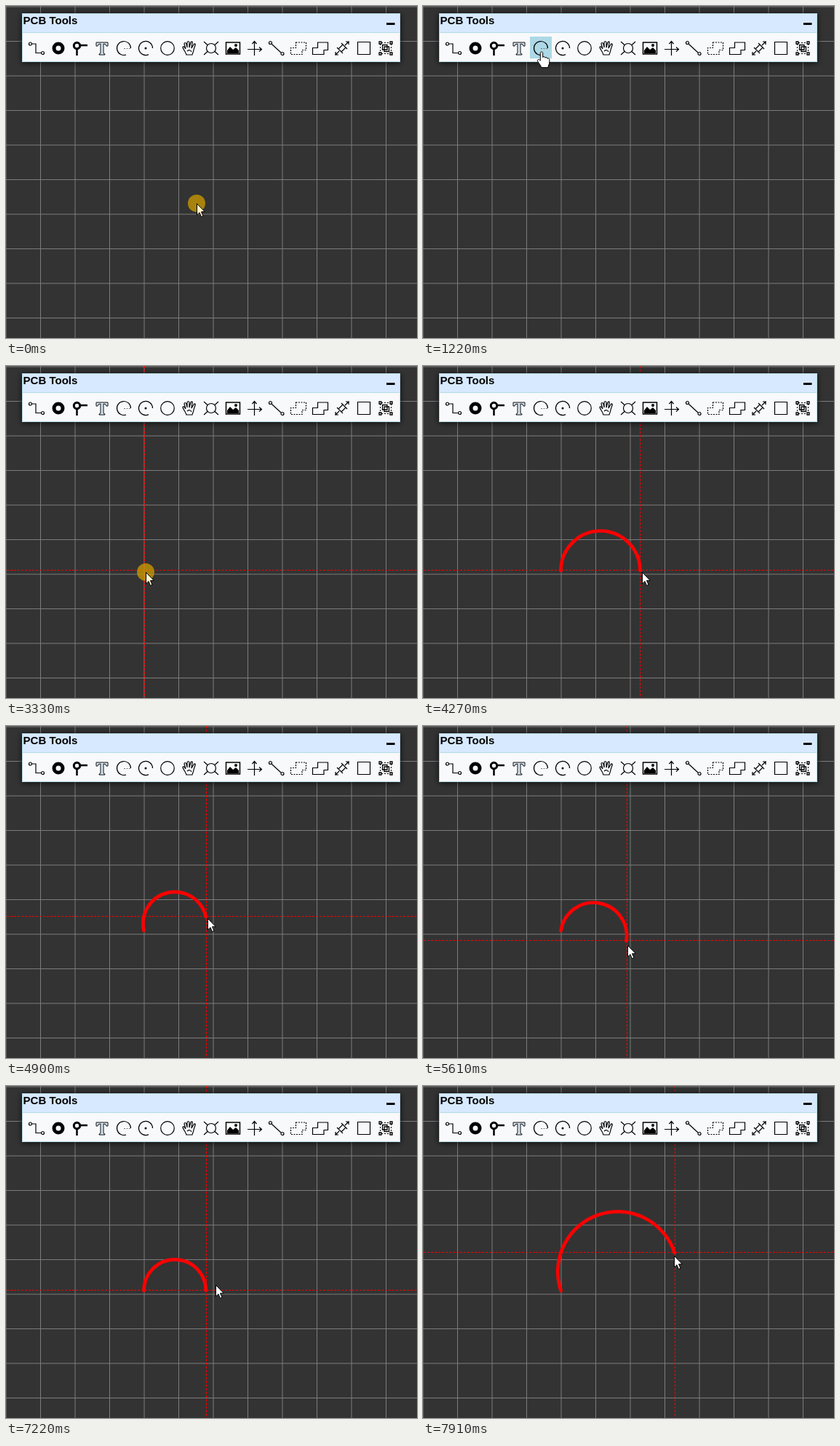
Animation, 565 px wide and 456 px high, one loop 8000 ms. Source, as an HTML page:

```html
<!DOCTYPE html>
<html lang="en">
<head>
<meta charset="utf-8">
<title>PCB Tools</title>
<style>
html, body { margin: 0; width: 100%; height: 100%; overflow: hidden; background: #333; }
svg { display: block; width: 565px; height: 456px; }
.title { font: bold 15px "Liberation Sans", Arial, sans-serif; }
.icons { fill: none; stroke: #000; stroke-width: 1.2; }
.icons .solid { fill: #000; stroke: none; }
.cross { fill: none; stroke: #f00; stroke-dasharray: 3 2; }
.pointer { stroke: #000; stroke-linejoin: round; }
</style>
</head>
<body>
<svg viewBox="0 0 565 456">
  <defs>
    <filter id="shadow" x="-5%" y="-30%" width="110%" height="160%">
      <feDropShadow dx="0" dy="1" stdDeviation="4" flood-color="#000" flood-opacity=".75"/>
    </filter>
  </defs>
  <rect width="565" height="456" fill="#333"/>
  <path id="grid" stroke="#7c7c7c" fill="none"/>
  <path id="arc" stroke="#f00" stroke-width="4.7" stroke-linecap="round" fill="none" transform="translate(-.5 .4)"/>
  <path id="cross" class="cross"/>

  <rect x="22" y="10" width="520" height="67" fill="#f8f9fa" filter="url(#shadow)"/>
  <path d="M22 10H542V37H22Z" fill="#d7e9fe"/>
  <path d="M22.5 10.5H541.5V76.5H22.5ZM22 36.5H542" fill="none" stroke="#b4dbe8"/>
  <text class="title" x="23.6" y="25">PCB Tools</text>
  <path d="M523 23H534.5V26H523Z"/>
  <rect id="hover" x="147" y="42" width="30" height="30" fill="#add8e6"/>

  <g class="icons" id="icons">
    <g><circle cx="-8.5" cy="-6" r="2"/><path d="M-6.5-6H-1V6.5H6"/><circle cx="8.5" cy="6.5" r="2"/></g>
    <g><circle r="6" stroke-width="5"/></g>
    <g stroke-width="3"><circle cx="-4.5" cy="-3.5" r="4.2"/><path d="M0-4H10M-4.5 1V10" stroke-width="2.5"/></g>
    <g><path d="M-8-8H8V-3H6Q6-6 2-6V6Q2 8 4 8V9H-4V8Q-2 8-2 6V-6Q-6-6-6-3H-8Z" fill="#d5e6f5" stroke="#111" stroke-width="1"/></g>
    <g><path d="M9.500 0A9.500 9.500 0 1 0 3 9"/><path d="M0 .5H10" stroke="#777" stroke-width="1" stroke-dasharray="2 1.5"/></g>
    <g><path d="M9.500 0A9.500 9.500 0 1 0 4 8.600"/><circle class="solid" r="1.5"/></g>
    <g><circle r="9.3"/></g>
    <g><path d="M-4 9C-5 5-8 2-9-1C-9-3-7-3-5 1L-7-6C-7-8-5-8-4-6L-3-1L-3-8C-2-10-1-10 0-8L0-1L2-8C3-10 5-9 4-7L3 0L6-5C7-7 9-6 8-4L6 2C6 6 4 7 4 9Z"/><path d="M-3 4Q1 1 3 5"/></g>
    <g><circle r="6.5"/><path d="M-10-9L-5-4.5M10-9L5-4.5M-10 9L-5 4.5M10 9L5 4.5"/></g>
    <g><path d="M-9.500-8H9.500V8H-9.500Z" stroke-width="1.5"/><path class="solid" d="M-8 7V3L-4-2L0 2L4-1L8 3V7Z"/><circle class="solid" cx="4" cy="-4" r="2"/></g>
    <g><path d="M-10 1.500H9M6-1.500L9.500 1.500L6 4.500M-.5 10V-9M-3.500-6L-.5-9.500L2.500-6"/></g>
    <g><path d="M-7-6L6 6"/><circle cx="-8.5" cy="-7.5" r="2"/><circle cx="8" cy="7.5" r="2"/></g>
    <g stroke-dasharray="2 1.5"><path d="M-3.500-8H10.500V2.500H5V8.500H-10.500V-.5H-3.500Z"/></g>
    <g><path d="M-3.500-8H10.500V2.500H5V8.500H-10.500V-.5H-3.500Z"/></g>
    <g><path d="M-9.500 9.500L-4 4M4-4L9.500-9.500M-7-1L1 7M-1-7L7 1M-5 1L1-5M-1 5L5-1M-9 5V9H-5M5-9H9V-5"/></g>
    <g><path d="M-8.500-8.500H8.500V8.500H-8.500Z"/></g>
    <g><path d="M-9-9h3v3h-3ZM6-9h3v3h-3ZM-9 6h3v3h-3ZM6 6h3v3h-3Z" stroke-width="1.3"/><path d="M-6-7.500H6M-6 7.500H6M-7.500-6V6M7.500-6V6" stroke-width="1" stroke-dasharray="2 2"/><path d="M-4.500-4.500H2V2H-4.500ZM-2-2H4.500V4.500H-2Z" stroke-width="1.3"/></g>
  </g>

  <circle id="press" r="12" fill="#c59602" fill-opacity=".8"/>
  <path id="arrow" class="pointer" d="M.5.5V16L4 12.700L6.500 18.500L9 17.400L6.500 11.700H11.300Z"/>
  <path id="hand" class="pointer" fill="#fff" d="M-1.700 12V1.600C-1.700-.5 1.700-.5 1.700 1.600V7.500C2 6 5 6.300 5 8.300C5.400 7 8 7.400 8 9.300C8.600 8.200 10.800 8.800 10.800 10.600V15C10.800 17 9 18 9 21.500H-.5C-.5 19-3 17-5.400 12.800C-6.400 10.800-4 9.600-2.800 11Z"/>
</svg>
<script>
const LOOP = 8000, STEP = 230 / 3, CELL = 47.5, SNAP = 4.737;
const START = [190.02, 280.6];
const APPEAR = 1760, DRAG = 3630;
const el = id => document.getElementById(id);
const show = (node, on) => node.setAttribute('visibility', on ? 'visible' : 'hidden');
const place = (node, [x, y]) => node.setAttribute('transform', `translate(${x} ${y})`);
const [grid, arc, cross, hover, press, arrow, hand] =
  ['grid', 'arc', 'cross', 'hover', 'press', 'arrow', 'hand'].map(el);

let lines = '';
for (let k = 0; k < 12; k++) lines += `M${CELL * k} 0V456M0 ${CELL * k + 1}H565`;
grid.setAttribute('d', lines);
[...el('icons').children].forEach((icon, i) => place(icon, [42 + 30 * i, 58]));

const HOME = [262, 271];
const moves = [
  { from: 540, to: 1160, at: [163, 63] },
  { from: 1640, to: 2470, at: [196, 286] },
  { from: 2780, to: 2930, at: [192, 283] },
  { from: 3560, to: 3900, at: [316, 283] },
  { from: 3900, to: 4120, at: [301, 283] },
  { from: 4200, to: 4900, at: [276, 264] },
  { from: 5000, to: 5380, at: [281, 296] },
  { from: 5530, to: 5600, at: [281, 301] },
  { from: 5600, to: 6530, at: [218, 325] },
  { from: 6530, to: 7830, at: [347, 229] },
  { from: 7830, to: 7900, at: [345, 233] }
];
const clicks = [[0, 610], [1530, APPEAR], [3330, DRAG]];

const ease = f => f * f * (3 - 2 * f);
const mix = (a, b, f) => a.map((v, k) => v + (b[k] - v) * f);
const snap = p => p.map((v, k) => START[k] + SNAP * Math.floor((v - START[k]) / SNAP));

function pointer(t) {
  return moves.reduce((p, { from, to, at }) => {
    const f = Math.min(1, Math.max(0, (t - from) / (to - from)));
    return mix(p, at, ease(f));
  }, HOME);
}

function draw(t) {
  // The picture moves in steps; the crosshair trails the pointer by one.
  const time = Math.floor((t - 10) / STEP) * STEP + 10;
  const tip = pointer(time).map(Math.round);
  const aim = snap(pointer(time - STEP));
  const pressed = clicks.some(([a, b]) => t >= a && t < b);
  const onButton = tip[0] > 147 && tip[0] < 177 && tip[1] > 42 && tip[1] < 72;
  show(hover, onButton);
  show(hand, onButton);
  show(arrow, !onButton);
  show(press, pressed);
  [hand, arrow, press].forEach(node => place(node, tip));
  arrow.setAttribute('fill', pressed ? '#fff5cf' : '#fff');

  const [x, y] = aim.map(v => Math.floor(v) + .5);
  show(cross, t >= APPEAR);
  cross.setAttribute('d', `M${x} 0V456M1 ${y}H565`);

  const radius = Math.hypot(aim[0] - START[0], aim[1] - START[1]) / 2;
  show(arc, t >= DRAG && radius > 1);
  arc.setAttribute('d', `M${START}A${radius} ${radius} 0 0 1 ${aim}`);
}

function tick() {
  draw(performance.now() % LOOP);
  requestAnimationFrame(tick);
}
tick();
</script>
</body>
</html>
```
